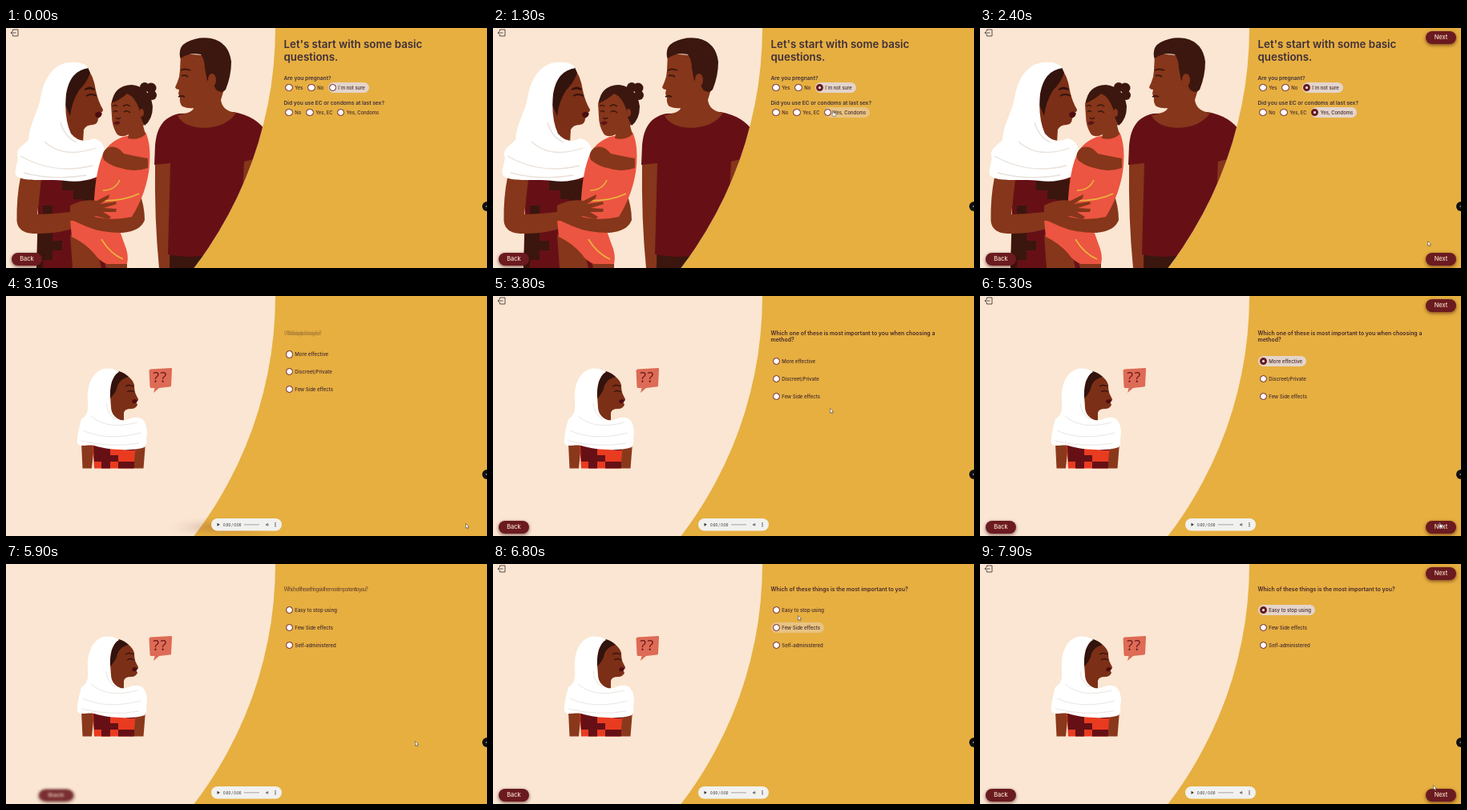
Recreate the animation shown at these times as an HTML page. Size 600 by 300 pixels, loop 8000 ms.

```html
<!DOCTYPE html>
<html lang="en">
<head>
<meta charset="utf-8">
<title>Method quiz</title>
<style>
html,body{margin:0;width:600px;height:300px;overflow:hidden;background:#e6af40}
body{position:relative;font-family:Inter,"Open Sans",sans-serif;color:#45292b}
svg,.page,.abs{position:absolute}
svg,.page{left:0;top:0;width:600px;height:300px}
.page{overflow:hidden}
h1,h2{position:absolute;margin:0;left:346.5px;font-weight:600;color:#40303a}
h1{top:12px;font-size:13.35px;line-height:16px}
h2{font-size:6.65px;line-height:8.6px;white-space:nowrap}
.quiz{position:absolute;left:346.5px;width:230px}
.quiz h2{position:static;font-size:6.9px;white-space:normal;margin-bottom:15.2px;color:#45262a}
.opt{position:relative;display:flex;align-items:center;width:max-content;height:13px;border-radius:7px;
  margin-bottom:8.8px;padding:0 4.5px 0 2px;font-size:6.05px;font-weight:500;white-space:nowrap}
.opt i{width:9.2px;height:9.2px;box-sizing:border-box;border:1.1px solid #671b20;border-radius:50%;background:#fff;margin-right:2.6px}
.page>.opt{position:absolute;margin:0;padding:0 5.2px 0 .4px;font-size:5.9px}
.btn{position:absolute;width:38px;height:16px;border-radius:8px;background:#6b1a20;color:#f8dfc8;
  font-size:7.4px;font-weight:500;line-height:16px;text-align:center;box-shadow:0 1.5px 4px rgba(50,0,0,.6);transform-origin:0 50%}
.exit{left:5px;top:0;width:11px;height:12px}
svg.player{left:256px;top:278px;width:88px;height:15.5px}
svg.cur{width:8px;height:10px}
svg.icon{width:11px;height:12px}
</style>
</head>
<body>
<svg viewBox="0 0 600 300">
  <defs><clipPath id="disc"><circle cx="-158" r="494"/></clipPath></defs>
  <circle cx="-158" r="494" fill="#fae6d2"/>
  <g id="family" clip-path="url(#disc)">
    <!-- man -->
    <path fill="#3a160e" d="M202 278H255V300H200Z"/>
    <path fill="#86361a" d="M186 168L206 168L204 300H191Q185 240 186 168M296 165L314 160V235H293Z"/>
    <path fill="#661016" d="M216 107C198 111 188 122 186 147L185 171L205 169L202 283Q230 289 255 283L294 230L297 167L325 160V130Q312 110 284 105Z"/>
    <path fill="#86361a" d="M218 32L217 53L216 61Q214 68 211 74Q212 77 216 77L215 82L217 87Q216 94 220 98Q227 101 234 100Q233 106 214 109C222 130 272 131 287 106Q270 104 268 90L274 70V36Z"/>
    <path fill="#3b170f" d="M217.500 38Q214 24 225 18Q240 10 256 13Q278 18 281 42Q281 60 274 77Q269 83 262 77Q258 70 256 62L251 66L248 50Q248 40 243 33Q229 30 217.500 38Z"/>
    <ellipse cx="257" cy="65" rx="5" ry="8" fill="#86361a"/>
    <path fill="none" stroke="#3b170f" d="M218 53Q223 50 230 53M219 60Q223 58 227 61M215 86Q219 84 223 86" stroke-width="1.800"/>
    <!-- mother -->
    <path fill="#661016" d="M41 186H125V300H38Z"/>
    <path fill="#3a160e" d="M70 190H122V222H96V214H84V203H70ZM46 222H58V234H46ZM40 254H58V266H70V278H58V290H46V300H38ZM70 238H84V252H70Z"/>
    <path fill="#86361a" d="M18 187Q13 212 13.500 241Q15 256 34 257Q65 258 92 248L90 229Q65 232 39 233L44 190Z"/>
    <path fill="#7c2f17" d="M75 60Q88 46 101 51Q109 58 112 78Q115 92 121 102Q121 105 117.500 106L119 110L115 113Q115 120 108 121Q100 121 97 127L96 144L70 146Z"/>
    <path fill="#32130d" d="M102 49Q76 50 74 96L80 110Q82 92 91 78Q101 68 105 56Z"/>
    <path fill="#fff" d="M103 50C97 43 88 42 79 43C58 45 47 64 43 88C39 108 29 120 28 140C20 148 13 151 14 159C17 165 10 175 12 183C17 194 55 188 74 191Q94 194 114 186L123 152Q120 140 109 138Q93 146 81 132Q72 112 75 82Q80 53 103 50Z"/>
    <path fill="none" stroke="#e9e0d8" stroke-width="1.300" d="M48 142Q72 164 112 150M18 160Q60 184 108 172M22 181Q60 191 100 184M68 118Q73 136 88 143"/>
    <path fill="#32130d" d="M98 76Q104 71 111 76L110 78Q104 75 98 78Z"/>
    <path stroke="#32130d" stroke-width="1.800" fill="none" d="M100 85Q106 81 113 85"/>
    <path fill="#4d0d10" d="M111 107Q116 102 120 107Q117 114 112 111Z"/>
    <!-- child -->
    <path fill="#86361a" d="M80 258L83 300H119L112 270ZM120 284L125 300H151V280Z"/>
    <path fill="#ec5541" d="M80 240L82 261Q99 269 110 282Q117 292 126 295H151Q154 284 147 268L140 248Z"/>
    <path fill="#86361a" d="M166 205Q173 222 173 240Q168 254 145 256Q118 256 100 248L82 240L92 225Q130 240 150 235Z"/>
    <path fill="#ec5541" d="M146 136Q127 143 120 160Q112 180 110 214L108 235Q130 242 157 236Q176 205 179 172Q181 145 174 130Z"/>
    <path fill="none" stroke="#e9b63e" stroke-width="1.600" d="M119 264Q130 282 146 289M121 203Q136 203 142 190M120 216Q148 216 166 207"/>
    <path fill="#86361a" d="M80 222Q96 213 113 216L129 208L128 213L117 220L137 217L138 220L122 225L138 226L137 230L121 230L131 236L128 239L112 235Q100 240 80 241Z"/>
    <path fill="#86361a" d="M131 95Q134 79 153 77Q175 82 178 104Q179 118 171 122L174 133Q165 141 152 138L153 133Q143 138 138 132Q132 122 132 110Z"/>
    <path fill="#86361a" d="M126 150Q118 156 122 165Q132 173 143 175Q160 181 177 175V163Q160 160 147 157Q137 145 126 150Z"/>
    <path fill="#3b170f" d="M132 94Q134 72 157 71Q180 74 183 98Q183 114 173 122Q167 112 166 101Q161 86 151 82Q142 90 132 94Z"/>
    <g fill="#3b170f"><circle cx="173" cy="74" r="6"/><circle cx="181" cy="75" r="6.500"/><circle cx="182" cy="84" r="6"/></g>
    <ellipse cx="169" cy="106" rx="3" ry="5" fill="#86361a"/>
    <path fill="none" stroke="#3b170f" stroke-width="1.500" d="M133 98Q136 95 139 98M146 98Q150 94 155 98M134 105Q137 102 139 105M147 105Q151 102 155 106M137 112Q140 115 143 112"/>
    <path fill="#5b1513" d="M134 119Q138 114 143 118Q139 124 134 119Z"/>
  </g>
  <g id="woman">
    <path fill="#8a381c" d="M94 184L95.500 215.500H107L110 186ZM159 188L160 215.500H171.500L174 184Z"/>
    <path fill="#e93b20" d="M108 186H162L159 215.500H110Z"/>
    <path fill="#661016" d="M109 187H130V199H140V207H130V215.500H119V207H110ZM140 207H160V215.500H140ZM150 187H161V193H150Z"/>
    <path fill="#7c2f17" d="M140 95Q156 99 160 111Q160 119 162 123L165 129Q165 132 162 132L164 136Q162 141 156 141Q148 141 147 146V158L132 152L129 110Z"/>
    <path fill="#32130d" d="M141 94Q129 103 130 128Q138 120 139 112Q143 103 153 101Q148 96 141 94Z"/>
    <path fill="#fff" d="M141 95C136 91 127 89 119 92C105 98 101 115 102 132C103 145 101 149 94 154C91 165 88 178 89 184C92 190 102 185 110 187C130 193 158 194 173 189C177 184 174 176 176 172C176 160 172 153 165 152C157 150 151 157 143 155C135 152 131 146 130 136C129 115 131 100 141 95Z"/>
    <path fill="none" stroke="#e9e6e1" d="M106 150Q126 168 164 158M96 168Q126 182 168 171M94 181Q130 190 166 184M125 134Q126 148 137 154"/>
    <path fill="none" stroke="#32130d" stroke-width="1.300" d="M149 113Q153 110 159 113M151 120Q155 117 160 120"/>
    <path fill="#4d0d10" d="M157 131Q161 127 164 131Q162 135 158 134Z"/>
    <path fill="#dd6b56" d="M180 91.500L206 90Q207.500 90 207 92L206 112Q206 113.500 204 113.500L191 115L184 121L185.500 115L181 115Q179.500 115 179.500 113L178.500 93Z"/>
    <text x="192.500" y="108" font-size="18" font-family="Open Sans,sans-serif" text-anchor="middle" letter-spacing="1.500" fill="#6e171b">??</text>
  </g>
  <circle cx="600" cy="223" r="6" fill="#111"/>
  <path d="M598.500 223H600" stroke="#ddd"/>
</svg>

<div class="page" id="a">
  <h1>Let's start with some basic<br>questions.</h1>
  <h2 style="top:58.500px">Are you pregnant?</h2>
  <h2 style="top:89.500px">Did you use EC or condoms at last sex?</h2>
</div>
<div class="page" id="b"><div class="quiz" style="top:42.700px"><h2>Which one of these is most important to you when choosing a method?</h2></div></div>
<div class="page" id="c"><div class="quiz" style="top:27.500px"><h2>Which of these things is the most important to you?</h2></div></div>

<svg class="player" id="player" viewBox="0 0 88 15.500">
  <rect width="88" height="15.500" rx="7.750" fill="#f1f1ef"/>
  <path d="M7.500 5.800L10.800 7.800L7.500 9.800Z" fill="#333"/>
  <text x="15" y="9.500" font-size="4.700" font-family="Roboto,sans-serif" fill="#333">0:00 / 0:00</text>
  <path d="M41 7.800H60" stroke="#aaa" stroke-width="1.100"/>
  <path d="M68 6.900H69.200L70.800 5.500V10.100L69.200 8.700H68ZM71.500 6.300Q72.700 7.800 71.500 9.300" fill="#777"/>
  <g fill="#333"><circle cx="80" cy="5.800" r=".7"/><circle cx="80" cy="7.800" r=".7"/><circle cx="80" cy="9.800" r=".7"/></g>
</svg>
<svg class="cur" id="arrow" viewBox="0 0 8 10"><path d="M.5.500V6.300L1.900 5.100L2.900 7.200L3.900 6.700L2.900 4.700H4.700Z" fill="#fff" stroke="#333" stroke-width=".5"/></svg>
<svg class="cur" id="hand" viewBox="0 0 8 10"><path d="M1.500.6Q2.500.3 2.600 1.300V3L5.300 3.700Q6 4 5.800 5L5.300 7.300H2.400L.4 4.700Q.6 4 1.600 4.600Z" fill="#fff" stroke="#333" stroke-width=".5"/></svg>

<script>
const LOOP = 8000, SWAP1 = 3058, SWAP2 = 5718;
const $ = id => document.getElementById(id);

// keys: [time, properties, easing]
function run(el, keys) {
  el.animate(keys.map(([t, props, easing = 'linear']) => ({ offset: t / LOOP, easing, ...props })),
    { duration: LOOP, iterations: Infinity });
}

// steps: [time, value], held until the next one
function hold(el, prop, steps) {
  const keys = steps.map(([t, v]) => [t, { [prop]: v }, 'step-end']);
  run(el, [...keys, [LOOP, { [prop]: steps[steps.length - 1][1] }]]);
}

function show(el, from, to) {
  const steps = from > 0 ? [[0, 0], [from, 1]] : [[0, 1]];
  if (to < LOOP) steps.push([to, 0]);
  hold(el, 'opacity', steps);
}

function slideIn(el, at, dist) {
  const away = { opacity: 0, transform: `translateX(${dist}px) scale(2.5,.2)`, filter: 'blur(14px)' };
  const home = { opacity: 1, transform: 'translateX(0px) scale(1,1)', filter: 'blur(0px)' };
  run(el, [[0, away], [at, away, 'cubic-bezier(.23,1,.32,1)'], [at + 500, home], [LOOP, home]]);
}

function trackIn(el, at) {
  const ease = 'cubic-bezier(.215,.61,.355,1)';
  const tight = { letterSpacing: '-.5em', opacity: 0 }, open = { letterSpacing: '0em', opacity: 1 };
  run(el, [[0, tight], [at, tight, ease], [at + 280, { opacity: .6 }, ease], [at + 700, open], [LOOP, open]]);
}

function add(parent, cls, html, style = '') {
  const el = document.createElement('div');
  el.className = cls;
  el.innerHTML = html;
  el.style.cssText = style;
  parent.append(el);
  return el;
}

const FILL = { off: 'rgba(232,220,216,0)', hover: 'rgba(236,220,212,.45)', on: 'rgba(228,218,222,.88)' };

// states: [time, fill name]; pick: time the dot is set
function option(parent, label, states = [], pick, style) {
  const el = add(parent, 'opt', `<i></i>${label}`, style);
  let last = FILL.off;
  const keys = [];
  for (const [t, name] of [[0, 'off'], ...states]) {
    keys.push([t, { backgroundColor: last }], [t ? t + 90 : 0, { backgroundColor: FILL[name] }]);
    last = FILL[name];
  }
  run(el, [...keys, [LOOP, { backgroundColor: last }]]);
  if (pick) hold(el.firstChild, 'borderWidth', [[0, '1.1px'], [pick, '3px']]);
  return el;
}

const EXIT = '<svg class="icon" viewBox="0 0 11 12"><path d="M3.500 4V2H10V10H3.500V8M7.500 6H1M2.800 4.200L1 6L2.800 7.800" fill="none" stroke="#4a3c3a" stroke-width=".9"/></svg>';

function buttons(page, at, nextAt) {
  const exit = add(page, 'abs exit', EXIT);
  const back = add(page, 'btn', 'Back', 'left:7px;top:281px');
  if (at) {
    slideIn(exit, at, -350);
    slideIn(back, at, 350);
  }
  for (const top of [4, 281]) slideIn(add(page, 'btn', 'Next', `left:555.500px;top:${top}px`), nextAt, 350);
}

const a = $('a'), b = $('b'), c = $('c');
const at = (x, y) => `left:${x}px;top:${y}px`;
option(a, 'Yes', [], 0, at(348, 68.300));
option(a, 'No', [], 0, at(376, 68.300));
option(a, 'I`m not sure', [[0, 'on']], 100, at(402.200, 68.300));
option(a, 'No', [], 0, at(348, 99.200));
option(a, 'Yes, EC', [], 0, at(374, 99.200));
option(a, 'Yes, Condoms', [[1050, 'hover'], [1600, 'on']], 1600, at(412.500, 99.200));
buttons(a, 0, 1620);

const qb = b.firstChild, qc = c.firstChild;
option(qb, 'More effective', [[4120, 'hover'], [4340, 'on']], 4340);
option(qb, 'Discreet/Private', [[4020, 'hover'], [4110, 'off'], [4500, 'hover'], [4760, 'off']]);
option(qb, 'Few Side effects', [[3900, 'hover'], [4000, 'off'], [4770, 'hover'], [4870, 'off']]);
buttons(b, SWAP1, 4340);

option(qc, 'Easy to stop using', [[6880, 'hover'], [7150, 'on']], 7150);
option(qc, 'Few Side effects', [[6480, 'hover'], [6810, 'off'], [7350, 'hover'], [7440, 'off']]);
option(qc, 'Self-administered', [[6330, 'hover'], [6450, 'off']]);
buttons(c, SWAP2, 7150);

trackIn(qb.firstChild, SWAP1);
trackIn(qc.firstChild, SWAP2);
show(a, 0, SWAP1);
show($('family'), 0, SWAP1);
show(b, SWAP1, SWAP2);
show(c, SWAP2, LOOP);
show($('woman'), SWAP1, LOOP);
show($('player'), SWAP1, LOOP);

const path = [[0, 412, 76], [400, 412, 76], [1100, 421, 101], [1300, 422, 103], [1700, 424, 104], [2600, 573, 284],
  [3160, 573, 284], [3800, 420, 140], [4180, 374, 82], [4400, 374, 82], [4600, 386, 100], [5350, 573, 284],
  [5740, 573, 284], [5900, 510, 221], [6300, 405, 112], [6550, 384, 78], [6720, 380, 72], [6800, 380, 64],
  [7000, 383, 57], [7220, 383, 58], [7900, 565, 276], [8000, 570, 282]];
for (const id of ['arrow', 'hand'])
  run($(id), path.map(([t, x, y]) => [t, { transform: `translate(${x}px,${y}px)` }, 'ease-in-out']));

// the pointer is a hand while over a control
const hand = [[0, 0], [400, 1], [520, 0], [1000, 1], [1850, 0], [2520, 1], [SWAP1, 0], [3900, 1], [4850, 0], [5280, 1],
  [SWAP2, 0], [6330, 1], [6740, 0], [6880, 1], [7450, 0]];
hold($('hand'), 'opacity', hand);
hold($('arrow'), 'opacity', hand.map(([t, v]) => [t, t < 400 ? 0 : 1 - v]));
</script>
</body>
</html>
```
